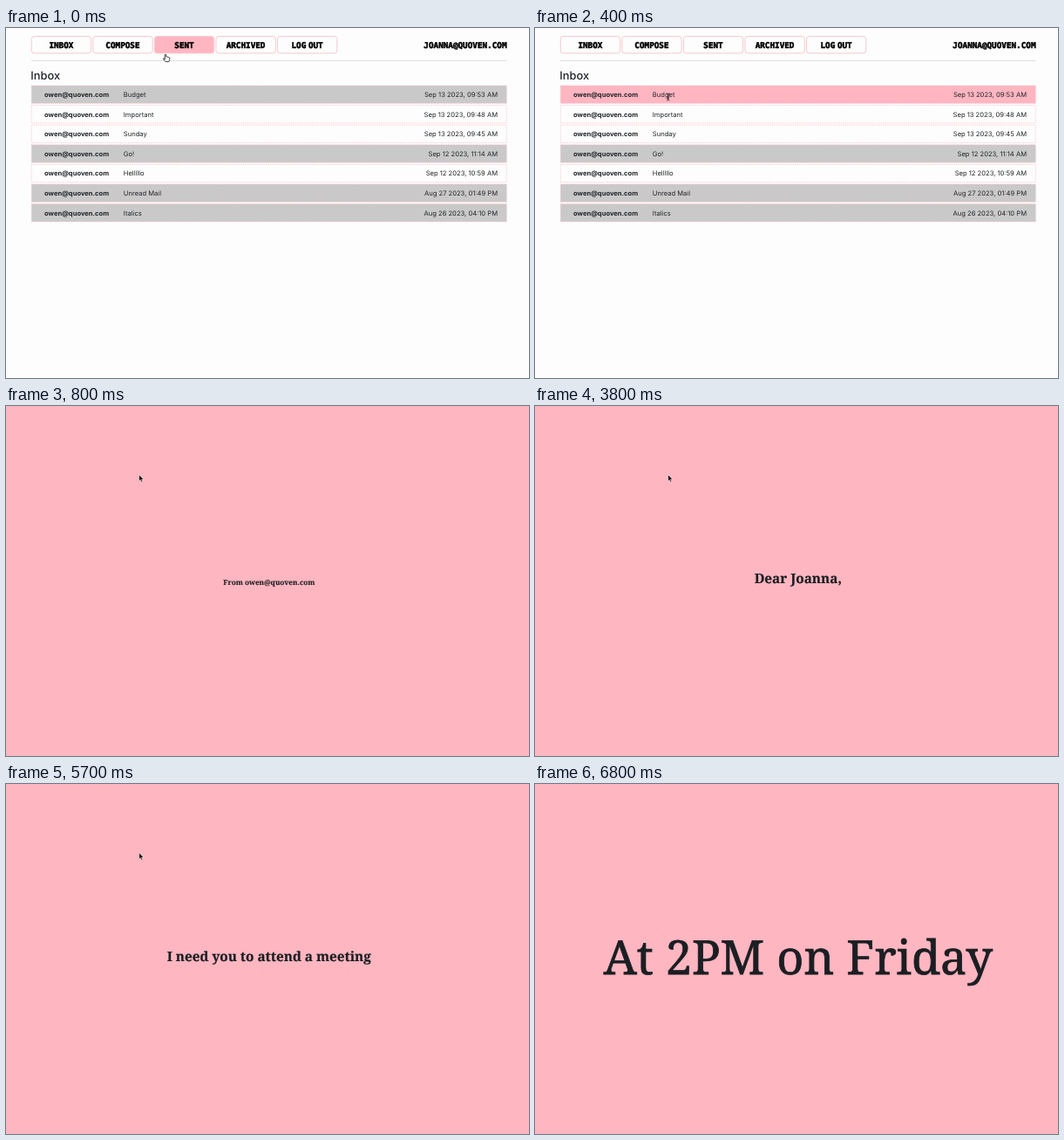
These frames come from a looping animation (600 by 401 pixels, 8 s). An HTML page:

```html
<!DOCTYPE html>
<html lang="en">
<head>
<meta charset="utf-8">
<title>Mail</title>
<style>
html, body { margin: 0; width: 100%; height: 100%; overflow: hidden; background: #fdfdfd; }
svg { display: block; width: 100vw; height: 100vh; }
text { fill: #212529; text-rendering: geometricPrecision; }
.nav { font: bold 9.3px "DejaVu Sans Mono", monospace; word-spacing: -3px; fill: #000; stroke: #000; stroke-width: .5px; }
.row { font: 7.6px Inter, sans-serif; }
.from { font-weight: 700; }
.head { font: 500 12.9px Inter, sans-serif; }
.letter { font-family: "Noto Serif", "Liberation Serif", serif; text-anchor: middle; fill: #1b1e22; stroke: #1b1e22; stroke-width: .014em; }
.mid { text-anchor: middle; }
.end { text-anchor: end; }
</style>
</head>
<body>
<svg id="stage" viewBox="0 0 600 401">
  <g id="inbox">
    <path d="M29 37.5H574.5" stroke="#dedede"/>
    <text class="head" x="28.2" y="58.6">Inbox</text>
  </g>
  <g id="mail">
    <rect width="600" height="401" fill="#feb6c1"/>
    <text id="line" class="letter" x="301.8"></text>
  </g>
  <g id="cursor" stroke-linejoin="round" stroke-linecap="round">
    <path id="arrow" d="M0 0V6.8L1.5 5.5L2.6 8L3.8 7.5L2.7 5.1H4.7Z" fill="#000" stroke="#fff" stroke-width=".4"/>
    <path id="beam" d="M-1.5 -4Q0 -4 0 -3V3Q0 4 -1.5 4M1.5 -4Q0 -4 0 -3V3Q0 4 1.5 4M-1 1H1" fill="none" stroke="#222" stroke-width=".7"/>
    <path id="hand" d="M-.8 5.6V1Q0 -.3 .8 1V3.2Q1.8 2.6 2.3 3.5Q3.3 3 3.7 3.9Q4.8 3.6 4.8 4.7Q4.9 7 3.9 8.8H0L-2.7 5.6Q-2.6 4.4 -.8 5.6Z" fill="#fff" stroke="#111" stroke-width=".8"/>
  </g>
</svg>
<script>
const LOOP = 8000, STEP = 100, PINK = "#ffb6c1", PAPER = "#fdfdfd", GREY = "#c9c9c9";
const $ = id => document.getElementById(id);

function add(tag, attrs, text = "") {
  const el = document.createElementNS("http://www.w3.org/2000/svg", tag);
  for (const k in attrs) el.setAttribute(k, attrs[k]);
  el.textContent = text;
  return $("inbox").appendChild(el);
}

const buttons = ["INBOX", "COMPOSE", "SENT", "ARCHIVED", "LOG OUT"].map((label, i) => {
  const x = 29.3 + i * 70.55;
  const box = add("rect", { x, y: 9.6, width: 68.3, height: 19.3, rx: 3, fill: PAPER, stroke: "#f7c9d0", "stroke-width": 1 });
  add("text", { class: "nav mid", x: x + 34.1, y: 22.6 }, label);
  return box;
});
add("text", { class: "nav end", x: 574.5, y: 22.6 }, "JOANNA@QUOVEN.COM");

const rows = [
  ["Budget", "Sep 13 2023, 09:53 AM", true],
  ["Important", "Sep 13 2023, 09:48 AM"],
  ["Sunday", "Sep 13 2023, 09:45 AM"],
  ["Go!", "Sep 12 2023, 11:14 AM", true],
  ["Helllllo", "Sep 12 2023, 10:59 AM"],
  ["Unread Mail", "Aug 27 2023, 01:49 PM", true],
  ["Italics", "Aug 26 2023, 04:10 PM", true]
].map(([subject, date, read], i) => {
  const y = 66 + i * 22.6, base = y + 13;
  const box = add("rect", { x: 29.3, y, width: 545, height: 20.3, fill: read ? GREY : PAPER,
    stroke: "#fbb9c4", "stroke-width": .8, "stroke-dasharray": "1.2 1.2" });
  add("text", { class: "row from", x: 44, y: base }, "owen@quoven.com");
  add("text", { class: "row", x: 134.8, y: base }, subject);
  add("text", { class: "row end", x: 564, y: base }, date);
  return box;
});

// start, text, size, weight, baseline
const lines = [
  [500, "From owen@quoven.com", 8.2, 700, 205],
  [3800, "Dear Joanna,", 15.3, 700, 203.4],
  [4700, "I need you to attend a meeting", 15.3, 700, 203.4],
  [6300, "At 2PM on Friday", 54, 400, 218]
];

const clamp = v => Math.max(0, Math.min(1, v));
const mix = (a, b, p) => a + (b - a) * p;
const show = (id, on) => $(id).setAttribute("display", on ? "inline" : "none");

function cursorAt(t) {
  const p = clamp(t / 400), enter = p * p * (3 - 2 * p);
  const leave = clamp((t - 6300) / 400) ** 2;
  return [mix(mix(183, 152.8, enter), 21, leave), mix(mix(29.8, 79, enter), 40, leave)];
}

function draw(t) {
  t = Math.floor(t / STEP) * STEP;
  const [x, y] = cursorAt(t);
  const open = t >= lines[0][0];
  const onButton = !open && y < 30, onRow = !open && y > 66;

  show("inbox", !open);
  show("mail", open);
  buttons[2].setAttribute("fill", onButton ? PINK : PAPER);
  rows[0].setAttribute("fill", onRow ? PINK : GREY);

  const line = lines.findLast(l => t >= l[0]);
  if (line) {
    const [, text, size, weight, base] = line;
    $("line").textContent = text;
    $("line").style.fontSize = size + "px";
    $("line").style.fontWeight = weight;
    $("line").setAttribute("y", base);
  }

  show("cursor", t < 6800);
  $("cursor").setAttribute("transform", `translate(${x} ${y})`);
  show("hand", onButton);
  show("beam", onRow);
  show("arrow", !onButton && !onRow);
}

const start = performance.now();
function frame() {
  draw((performance.now() - start) % LOOP);
  requestAnimationFrame(frame);
}
frame();
</script>
</body>
</html>
```
